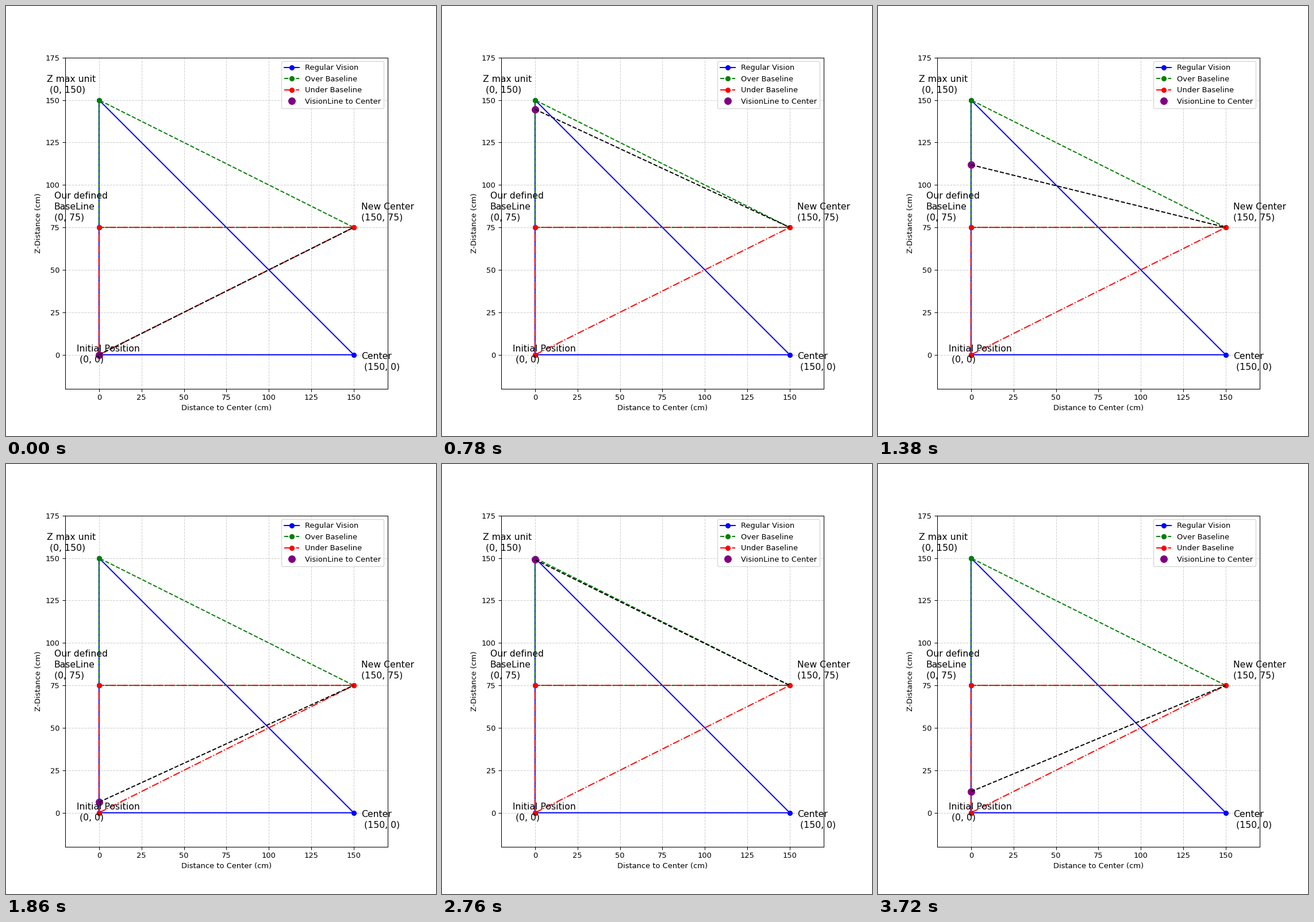
A matplotlib script for the animation above (3.78 s loop, 748x748 px).

```python
import numpy as np
import matplotlib.pyplot as plt
from matplotlib.animation import FuncAnimation

FRAMES = 63
INTERVAL = 60
HEIGHT = 150
TARGET = (150, 75)

plt.rcParams["font.family"] = "DejaVu Sans"

fig, ax = plt.subplots(figsize=(8, 8), dpi=93.5)
ax.set_xlim(-20, 170)
ax.set_ylim(-20, 175)
ax.set_aspect("equal", adjustable="box")
ax.set_xticks(range(0, 151, 25))
ax.set_yticks(range(0, 176, 25))
ax.set_xlabel("Distance to Center (cm)")
ax.set_ylabel("Z-Distance (cm)")
ax.grid(True, linestyle="--", alpha=0.6)


def triangle(corners, style, label):
    xs, ys = zip(*corners, corners[0])
    ax.plot(xs, ys, style, label=label)


def note(text, point, offset):
    ax.annotate(text, point, xytext=offset, textcoords="offset points",
                fontsize=12, linespacing=1.3)


triangle([(0, 0), (150, 0), (0, HEIGHT)], "bo-", "Regular Vision")
triangle([(0, 75), TARGET, (0, HEIGHT)], "go--", "Over Baseline")
triangle([(0, 0), TARGET, (0, 75)], "ro-.", "Under Baseline")

note("Initial Position\n (0, 0)", (0, 0), (-30, -10))
note("Z max unit\n (0, 150)", (0, HEIGHT), (-70, 10))
note("Center\n (150, 0)", (150, 0), (10, -20))
note("Our defined\nBaseLine\n(0, 75)", (0, 75), (-60, 10))
note("New Center\n(150, 75)", TARGET, (10, 10))

eye, = ax.plot([], [], "o", color="purple", markersize=9,
               label="VisionLine to Center")
sight, = ax.plot([], [], "k--")
ax.legend(loc="upper right")


def update(i):
    z = HEIGHT * abs(np.sin(0.1 * i))
    eye.set_data([0], [z])
    sight.set_data([0, TARGET[0]], [z, TARGET[1]])
    return eye, sight


anim = FuncAnimation(fig, update, frames=FRAMES, interval=INTERVAL,
                     repeat=True, repeat_delay=0)
plt.show()
```
